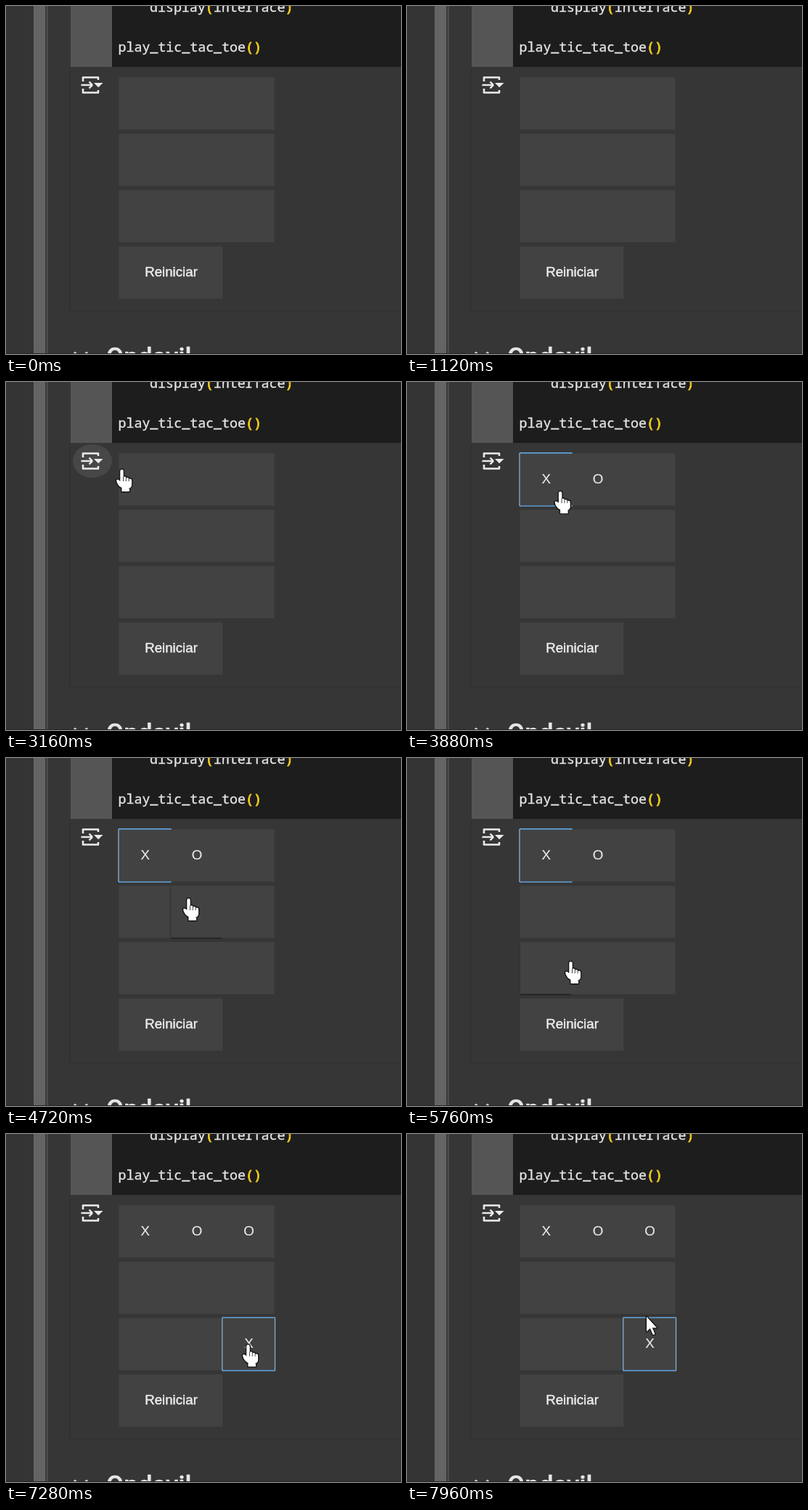
An HTML page with a canvas for the animation above (8000 ms loop, 544 by 480 pixels).

```html
<!DOCTYPE html>
<html lang="es">
<head>
<meta charset="utf-8">
<title>Tic tac toe</title>
<style>
html, body { margin: 0; width: 100%; height: 100%; overflow: hidden; background: #363636; }
canvas { display: block; }
</style>
</head>
<body>
<canvas id="stage" width="544" height="480"></canvas>
<script>
const ctx = document.getElementById('stage').getContext('2d');
const LOOP = 8000, STEP = 40, HOVER_LAG = 200;
const FIRST_CLICK = 3760, SECOND_CLICK = 7240;
const LABEL = '18.7px "Liberation Sans", Arial, sans-serif';
const MONO = '18.3px "Noto Sans Mono", monospace';
const LEFT = 155.5, TOP = 98.5, COL = 71.4, ROW = 77.7, CELL_H = 72;
const INK = '#ececec';

// Key points of the pointer, joined by a smooth curve
const PATH = [
  { t: 1560, x: 552, y: 336 },
  { t: 2200, x: 423, y: 304 },
  { t: 2960, x: 128, y: 112 },
  { t: 3160, x: 159.5, y: 120 },
  { t: 4720, x: 251.5, y: 193 },
  { t: 5480, x: 208, y: 272 },
  { t: 5760, x: 225.5, y: 280 },
  { t: 6680, x: 311.5, y: 288 },
  { t: 7240, x: 333, y: 291 },
  { t: 7960, x: 329, y: 250 }
];

function pointerAt(t) {
  if (t < PATH[0].t) return null;
  const last = PATH.length - 1;
  const i = Math.min(PATH.findLastIndex(p => p.t <= t), last - 1);
  const a = PATH[i], b = PATH[i + 1];
  const before = PATH[Math.max(i - 1, 0)], after = PATH[Math.min(i + 2, last)];
  const span = b.t - a.t, u = Math.min(1, (t - a.t) / span);
  const ease = u * u * (3 - 2 * u);
  const mix = k => {
    const leave = (b[k] - before[k]) / (b.t - before.t) * span;
    const arrive = (after[k] - a[k]) / (after.t - a.t) * span;
    return a[k] + (b[k] - a[k]) * ease + leave * u * (1 - u) ** 2 - arrive * u * u * (1 - u);
  };
  return { x: mix('x'), y: mix('y') };
}

function cellBox(n) {
  return { x: LEFT + (n % 3) * COL, y: TOP + Math.floor(n / 3) * ROW };
}

function cellUnder(p) {
  if (!p) return -1;
  const col = Math.floor((p.x - LEFT) / COL), row = Math.floor((p.y - TOP) / ROW);
  const inside = col >= 0 && col < 3 && row >= 0 && row < 3 && p.y - TOP - row * ROW < CELL_H;
  return inside ? row * 3 + col : -1;
}

function overIcon(p) {
  return !!p && ((p.x - 119) / 27) ** 2 + ((p.y - 109) / 23) ** 2 < 1;
}

function rect(color, x, y, w, h) {
  ctx.fillStyle = color;
  ctx.fillRect(x, y, w, h);
}

// A thin stroke gives the text its heavier screen weight
function text(str, x, y, font, color, align = 'left', weight = 0.45) {
  ctx.font = font;
  ctx.fillStyle = ctx.strokeStyle = color;
  ctx.textAlign = align;
  ctx.lineWidth = weight;
  ctx.fillText(str, x, y);
  ctx.strokeText(str, x, y);
}

function line(color, width, ...pts) {
  ctx.strokeStyle = color;
  ctx.lineWidth = width;
  ctx.beginPath();
  for (let i = 0; i < pts.length; i += 2) ctx.lineTo(pts[i], pts[i + 1]);
  ctx.stroke();
}

function code(name, arg, x, y) {
  for (const part of [name, '(', arg, ')']) {
    const bracket = part === '(' || part === ')';
    text(part, x, y, MONO, bracket ? '#f5cc22' : '#e4e4e4', 'left', bracket ? 0.9 : 0.4);
    x += ctx.measureText(part).width;
  }
}

function drawPage() {
  rect('#363636', 0, 0, 544, 480);
  rect('#343434', 0, 0, 38, 480);
  rect('#646464', 38, 0, 16, 480);
  rect('#3c3c3c', 54, 0, 2, 480);
  rect('#4c4c4c', 56, 0, 2, 480);
  rect('#555555', 89, 0, 57, 84);
  rect('#1d1d1d', 146, 0, 398, 84);
  code('display', 'interface', 198, 8);
  code('play_tic_tac_toe', '', 154.5, 63);
  line('#303030', 1.2, 88, 84, 88, 420.5, 544, 420.5);
  line('#d8d8d8', 3, 94, 477.5, 103, 486, 112, 477.5);
  text('Ondavil', 138, 495.5, '500 35px Roboto, sans-serif', '#e6e6e6');
  rect('#2a2426', 0, 479, 544, 1);
}

function drawIcon(hovered) {
  if (hovered) {
    ctx.fillStyle = '#474747';
    ctx.beginPath();
    ctx.ellipse(119, 109, 27, 23, 0, 0, 7);
    ctx.fill();
  }
  ctx.save();
  ctx.translate(117, 109);
  ctx.lineJoin = 'round';
  for (const side of [-1, 1]) {
    line(INK, 2.6, -11, side * 5, -11, side * 10.5, 10, side * 10.5, 10, side * 7);
    line(INK, 2.4, -2.5, side * 4.5, 2, 0);
  }
  line(INK, 2.4, -13.5, 0, 2, 0);
  ctx.fillStyle = INK;
  ctx.beginPath();
  ctx.moveTo(4, -3);
  ctx.lineTo(16.5, -3);
  ctx.lineTo(10.2, 3.2);
  ctx.fill();
  ctx.restore();
}

function drawBoard(t, hovered) {
  for (let row = 0; row < 3; row++) rect('#424242', LEFT, TOP + row * ROW, 3 * COL, CELL_H);
  rect('#424242', LEFT, TOP + 3 * ROW, 2 * COL, CELL_H);
  text('Reiniciar', 227.5, 373, LABEL, '#eeeeee', 'center');

  if (hovered >= 0) {
    const { x, y } = cellBox(hovered);
    rect('#343434', x - 1, y + 1, 1.3, CELL_H);
    rect('#242424', x + 1, y + CELL_H - 0.5, COL - 2, 1.8);
  }
  if (t >= FIRST_CLICK) {
    drawMark(0, 'X');
    drawMark(1, 'O');
  }
  if (t >= SECOND_CLICK) {
    drawMark(8, 'X');
    drawMark(2, 'O');
  }
  if (t >= FIRST_CLICK) drawFocus(t < SECOND_CLICK ? 0 : 8);
}

function drawMark(n, mark) {
  const { x, y } = cellBox(n);
  text(mark, x + COL / 2 + 0.5, y + 41.5, LABEL, '#e8e8e8', 'center', 0.2);
}

function drawFocus(n) {
  const { x, y } = cellBox(n);
  const l = x - 0.5, r = x + COL + 0.8, top = y - 0.6, bottom = y + CELL_H + 0.5;
  line('#62a2dc', 1.6, l, top, r, top);
  line('#62a2dc', 1.6, l, bottom, r, bottom);
  line('#86abc9', 1.4, l, top, l, bottom);
  // The right edge lies under the next cell of the row
  if (n % 3 === 2) line('#86abc9', 1.4, r, top, r, bottom);
}

const ARROW = new Path2D('M1 2V22.5L5.8 18L9.8 27L12.5 26L8.8 17.3H15Z');

function handShape() {
  const hand = new Path2D();
  hand.ellipse(-3, 20, 2.6, 6.5, -0.6, 0, 7);
  for (let i = 0; i < 4; i++) {
    const y = i ? 9 + 1.5 * i : 0.8;
    hand.roundRect(-2.2 + 3.8 * i, y, 4.4, 22 - y, 2.2);
  }
  hand.roundRect(-2.2, 17, 15.8, 10, [0, 0, 5, 5]);
  hand.rect(0, 25, 10.5, 6);
  return hand;
}
const HAND = handShape();

function drawPointer(p) {
  const hand = cellUnder(p) >= 0 || overIcon(p);
  const shape = hand ? HAND : ARROW;
  ctx.save();
  ctx.translate(p.x, p.y);
  ctx.lineJoin = 'round';
  ctx.strokeStyle = '#161616';
  ctx.lineWidth = 2.8;
  ctx.stroke(shape);
  ctx.fillStyle = '#ffffff';
  ctx.fill(shape);
  if (hand) {
    for (let i = 1; i < 4; i++) line('#444444', 1, 3.8 * i - 1.8, 9 + 1.5 * i, 3.8 * i - 1.8, 17);
  }
  ctx.restore();
}

function draw(t) {
  const pointer = pointerAt(t), lagged = pointerAt(t - HOVER_LAG);
  drawPage();
  drawIcon(overIcon(lagged));
  drawBoard(t, cellUnder(lagged));
  if (pointer) drawPointer(pointer);
}

const start = performance.now();
function tick() {
  const t = (performance.now() - start) % LOOP;
  draw(Math.floor(t / STEP) * STEP);
  requestAnimationFrame(tick);
}
tick();
</script>
</body>
</html>
```
